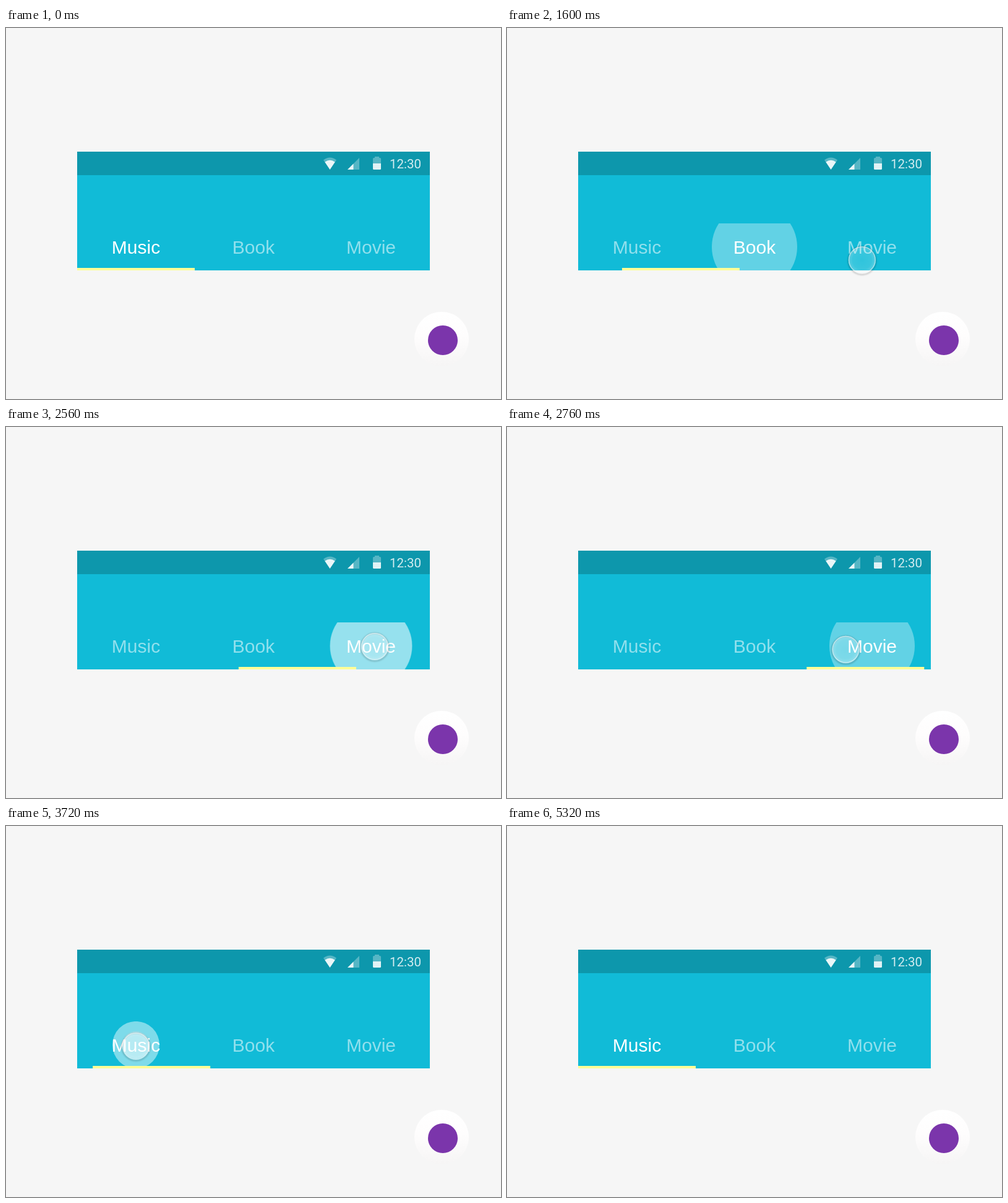
Recreate the animation shown at these times as an HTML page. Size 800x600 px, loop 5.36 s.

```html
<!DOCTYPE html>
<html lang="en">
<head>
<meta charset="utf-8">
<title>Tab bar</title>
<style>
  html, body { margin: 0; width: 100%; height: 100%; overflow: hidden; background: #f6f6f6; }
  svg { display: block; width: 800px; height: 600px; }
  .tab { font: 30px "Liberation Sans", Arial, sans-serif; text-anchor: middle; fill: #fff; }
  .clock { font: 20.5px Roboto, sans-serif; fill: #fff; fill-opacity: .82; }
</style>
</head>
<body>
<svg viewBox="0 0 800 600">
  <defs>
    <clipPath id="tabArea"><rect x="115" y="316" width="570" height="76"/></clipPath>
    <linearGradient id="plate" x1="0" y1="0" x2="0" y2="1">
      <stop offset="0" stop-color="#fff"/>
      <stop offset=".45" stop-color="#fefdfd"/>
      <stop offset="1" stop-color="#f6f5f5"/>
    </linearGradient>
    <radialGradient id="glass">
      <stop offset="0" stop-color="#fff" stop-opacity=".13"/>
      <stop offset=".7" stop-color="#fff" stop-opacity=".17"/>
      <stop offset="1" stop-color="#fff" stop-opacity=".32"/>
    </radialGradient>
    <filter id="blur" x="-30%" y="-30%" width="160%" height="160%">
      <feGaussianBlur stdDeviation="1"/>
    </filter>
  </defs>

  <rect width="800" height="600" fill="#f6f6f6"/>
  <rect x="115" y="200" width="570" height="192" fill="#11bbd7"/>
  <rect x="115" y="200" width="570" height="38" fill="#0d97ac"/>

  <g fill="#fff">
    <path d="M523.5 229L513 213.5Q523.5 205.500 534 213.500Z" opacity=".3"/>
    <path d="M523.5 229L515.300 216.800Q523.500 210.700 531.700 216.800Z" opacity=".88"/>
    <path d="M552 229H571V210Z" opacity=".3"/>
    <path d="M552 229H561.500V219.500Z" opacity=".88"/>
    <path d="M593 219V211.500Q593 210 594.500 210H596V208H603V210H604.500Q606 210 606 211.500V219Z" opacity=".3"/>
    <path d="M593 219H606V227.500Q606 229 604.500 229H594.500Q593 229 593 227.500Z" opacity=".88"/>
  </g>
  <text class="clock" x="620" y="227">12:30</text>

  <g id="ripples" clip-path="url(#tabArea)" fill="#fff"></g>
  <rect id="bar" x="115" y="388" width="190" height="4" fill="#fdfd96"/>
  <g id="tabs"></g>

  <circle cx="704" cy="503" r="44" fill="url(#plate)"/>
  <circle cx="706" cy="505" r="24" fill="#7b35ab"/>

  <g id="cursor">
    <circle cy="1" r="22.500" fill="none" stroke="#000" stroke-opacity=".22" stroke-width="2" filter="url(#blur)"/>
    <circle r="22" fill="url(#glass)"/>
    <circle r="21.300" fill="none" stroke="#fff" stroke-opacity=".48" stroke-width="1.500"/>
  </g>
</svg>
<script>
const LOOP = 5360, STEP = 40;
const FULL = 69;
const tabs = [
  { name: 'Music', x: 210, press: 3560 },
  { name: 'Book', x: 400, press: 1080 },
  { name: 'Movie', x: 590, press: 2280 }
];

const clamp = v => Math.max(0, Math.min(1, v));
const ramp = (t, from, to) => clamp((t - from) / (to - from));
const sine = p => (1 - Math.cos(Math.PI * p)) / 2;
const quad = p => p < .5 ? 2 * p * p : 1 - 2 * (1 - p) ** 2;
const cubic = p => p < .5 ? 4 * p ** 3 : 1 - 4 * (1 - p) ** 3;

// Each move is [start, end, target, easing].
const track = (first, moves) => t =>
  moves.reduce((v, [a, b, to, ease]) => v + (to - v) * ease(ramp(t, a, b)), first);

const barX = track(115, [
  [1384, 1884, 305, quad], [2344, 2844, 495, quad], [3311, 3811, 115, quad]
]);
const cursorX = track(406, [
  [0, 1000, 392, sine], [1160, 1789, 596, cubic], [2640, 3160, 210, sine]
]);
const cursorY = track(624, [
  [0, 1000, 357, sine], [1160, 1640, 375.5, sine], [1640, 1960, 355, sine],
  [2640, 2900, 366, sine], [2900, 3180, 356, sine], [3880, 4500, 626, sine]
]);

const byId = id => document.getElementById(id);
function add(parent, tag, attrs) {
  const el = document.createElementNS('http://www.w3.org/2000/svg', tag);
  set(el, attrs);
  return parent.appendChild(el);
}
function set(el, attrs) {
  for (const key in attrs) el.setAttribute(key, attrs[key]);
}

for (const tab of tabs) {
  tab.wave = add(byId('ripples'), 'circle', { cx: tab.x, cy: 354 });
  tab.core = add(byId('ripples'), 'circle', { cx: tab.x, cy: 354 });
  tab.label = add(byId('tabs'), 'text', { class: 'tab', x: tab.x, y: 365 });
  tab.label.textContent = tab.name;
}

function drawTab(tab, i, t) {
  const age = t - tab.press;
  set(tab.wave, {
    r: FULL * ramp(age, 0, 290),
    opacity: (.46 - .12 * ramp(age, 160, 280)) * (1 - ramp(age, 520, 740))
  });
  set(tab.core, {
    r: FULL * ramp(age, 100, 288),
    opacity: .33 * (1 - ramp(age, 300, 480))
  });
  const next = tabs[(i + 1) % 3].press;
  const on = ramp(t, tab.press, tab.press + 120);
  const off = ramp(t, next, next + 120);
  const active = i === 0 ? 1 - off + on : on - off;
  set(tab.label, { 'fill-opacity': .54 + .46 * clamp(active) });
}

function draw(time) {
  const t = Math.floor((time % LOOP) / STEP) * STEP;
  tabs.forEach((tab, i) => drawTab(tab, i, t));
  set(byId('bar'), { x: barX(t) });
  set(byId('cursor'), { transform: `translate(${cursorX(t)} ${cursorY(t)})` });
}

const start = performance.now();
function tick(now) {
  draw(Math.max(0, now - start));
  requestAnimationFrame(tick);
}
draw(0);
requestAnimationFrame(tick);
</script>
</body>
</html>
```
